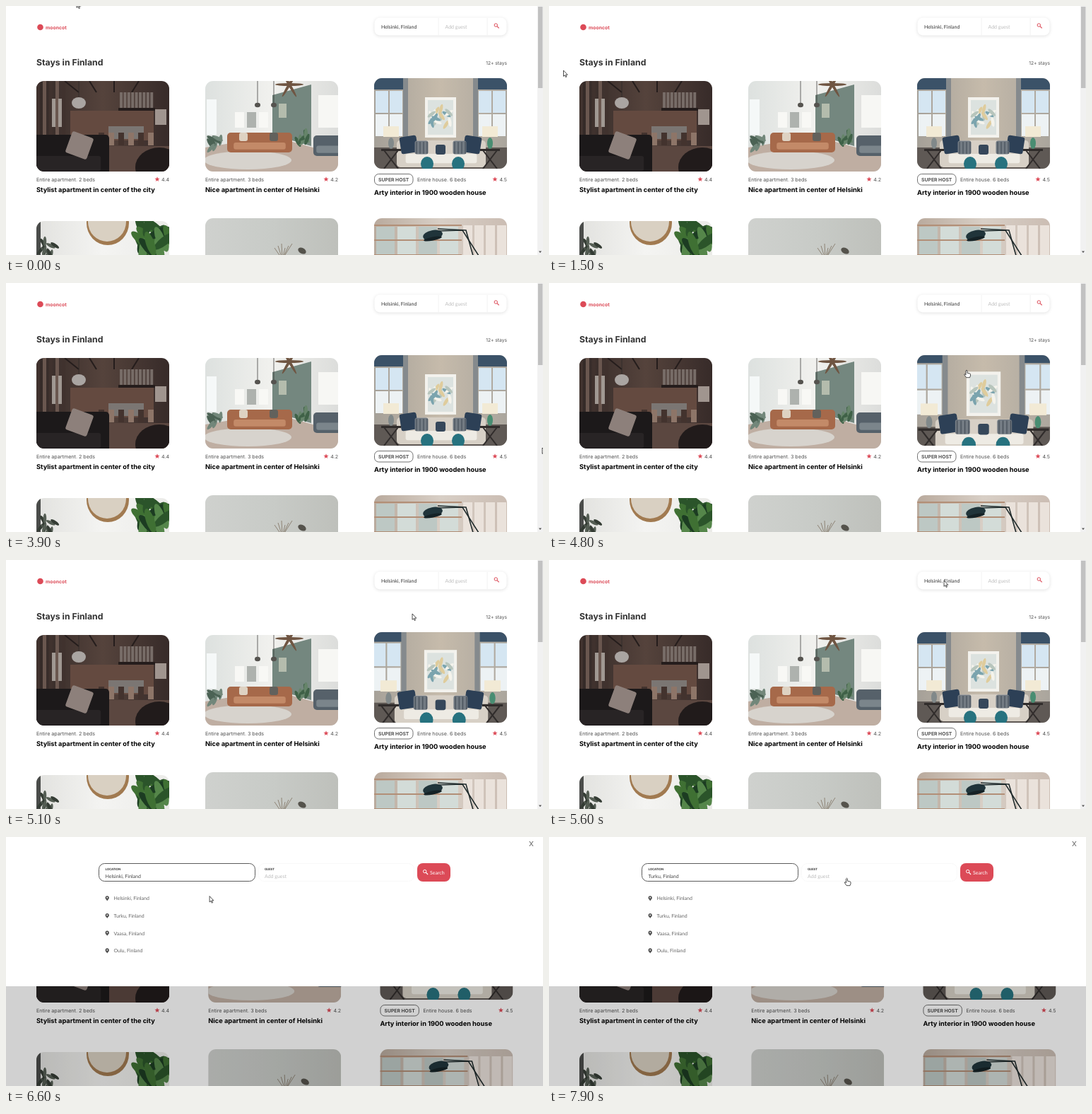
These frames come from a looping animation (760x352 px, 8 s). An HTML page with a canvas:

```html
<!DOCTYPE html>
<html lang="en">
<head>
<meta charset="utf-8">
<title>Stays in Finland</title>
<style>
html, body { margin: 0; width: 100%; height: 100%; overflow: hidden; background: #fff; }
canvas { display: block; width: 760px; height: 352px; }
</style>
</head>
<body>
<canvas id="stage"></canvas>
<script>
const W = 760, H = 352, LOOP = 8000, STEP = 100;
const OPEN = 5700, PICK = 7200, FADE = 400;
const CARD_W = 188, CARD_H = 128, LEFT = 43;
const RED = '#dc4a57', INK = '#4f4f4f', PALE = '#bdbdbd';
const HEAD = 'Inter, sans-serif', BODY = 'Lato, sans-serif';
const canvas = document.getElementById('stage');
const ctx = canvas.getContext('2d');
const dpr = window.devicePixelRatio || 1;
canvas.width = W * dpr;
canvas.height = H * dpr;
ctx.textRendering = 'geometricPrecision';

const clamp = v => Math.max(0, Math.min(1, v));
const smooth = v => { v = clamp(v); return v * v * (3 - 2 * v); };
const repeat = (n, fn) => { for (let i = 0; i < n; i++) fn(i); };

function random(seed) {
  return () => (seed = seed * 16807 % 2147483647) / 2147483647;
}

function rect(x, y, w, h, color) {
  ctx.fillStyle = color;
  ctx.fillRect(x, y, w, h);
}

function box(x, y, w, h, r, fill, stroke) {
  ctx.beginPath();
  ctx.roundRect(x, y, w, h, r);
  if (fill) { ctx.fillStyle = fill; ctx.fill(); }
  if (stroke) { ctx.strokeStyle = stroke; ctx.lineWidth = 0.8; ctx.stroke(); }
}

function oval(x, y, rx, ry, color, turn = 0) {
  ctx.beginPath();
  ctx.ellipse(x, y, rx, ry, turn, 0, Math.PI * 2);
  ctx.fillStyle = color;
  ctx.fill();
}

function trace(p) {
  ctx.beginPath();
  for (let i = 0; i < p.length; i += 2) ctx.lineTo(p[i], p[i + 1]);
}

function poly(color, ...p) {
  trace(p);
  ctx.fillStyle = color;
  ctx.fill();
}

function line(color, width, ...p) {
  trace(p);
  ctx.strokeStyle = color;
  ctx.lineWidth = width;
  ctx.stroke();
}

function text(str, x, y, size, weight, color, family = HEAD, align = 'left') {
  ctx.font = `${weight} ${size}px ${family}`;
  ctx.textAlign = align;
  ctx.fillStyle = color;
  ctx.fillText(str, x, y);
}

// Furniture shared by the rooms, which are CARD_W x CARD_H.
function wall(...colors) {
  const g = ctx.createLinearGradient(0, 0, CARD_W, 0);
  colors.forEach((c, i) => g.addColorStop(i / (colors.length - 1), c));
  rect(0, 0, CARD_W, CARD_H, g);
}

function sofa(x, y, w, h, back, seat) {
  box(x, y, w, h, 5, back);
  box(x + w * 0.1, y + h / 2, w * 0.8, h * 0.35, 3, seat);
}

function cushion(x, y, size, color, turn = 0) {
  ctx.save();
  ctx.translate(x, y);
  ctx.rotate(turn);
  box(-size / 2, -size / 2, size, size, 3, color);
  ctx.restore();
}

function lamp(x, y, r, color) {
  line('#2b2a29', 0.7, x, 0, x, y);
  oval(x, y, r, r * 0.8, color);
}

function leaves(x, y, n, spread, length, seed, colors) {
  const next = random(seed);
  repeat(n, i => oval(x + (next() - 0.5) * spread, y + (next() - 0.5) * spread,
    length / 3, length, colors[i % colors.length], (next() - 0.5) * 2.4));
}

function loft() {
  wall('#332927', '#55433c', '#372b29');
  repeat(5, i => rect(i * 9, 0, 5, 80, i % 2 ? '#6a574f' : '#40322e'));
  repeat(2, i => rect(22 + i * 9, 25, 5, 40, '#a09892'));
  repeat(4, i => line('#251d1c', 2, 40 + i * 35, 0, 60 + i * 25, 16));
  rect(48, 42, 118, 42, '#644a40');
  repeat(9, i => rect(118 + i * 5.4, 16, 4, 22, '#776c67'));
  rect(116, 38, 52, 4, '#251d1c');
  rect(168, 40, 16, 22, '#a0958f');
  rect(60, 92, 128, 36, '#5b4740');
  rect(102, 64, 50, 18, '#7b7673');
  repeat(6, i => rect(88 + i * 14, 73, 8, 18, i % 2 ? '#8d7568' : '#43332e'));
  lamp(60, 31, 10, '#aaa5a2');
  sofa(-15, 76, 118, 60, '#1c191a', '#282425');
  cushion(61, 91, 32, '#8d807b', 0.35);
  oval(174, 122, 34, 28, '#211b1b');
}

function lounge() {
  wall('#dde1df', '#f1f1ee', '#dcdddb');
  rect(2, 26, 14, 50, '#f5f8f8');
  repeat(3, i => rect(42 + i * 17, 44, 13, 22, i % 2 ? '#aeb2ae' : '#f8f8f5'));
  poly('#74877f', 95, 20, 150, 5, 150, 92, 95, 76);
  rect(104, 32, 11, 20, '#b4bcad');
  rect(160, 20, 28, 46, '#f7f7f4');
  poly('#bfaea2', 0, 94, 95, 78, 188, 104, 188, 128, 0, 128);
  oval(60, 112, 62, 13, '#d7d3cd');
  repeat(2, i => lamp(74 + i * 23, 34, 4, '#55534f'));
  repeat(3, i => oval(119, 5, 20, 2, '#6f5542', i * 1.05));
  sofa(31, 73, 92, 28, '#a6694a', '#c38a68');
  repeat(2, i => cushion(54 + i * 43, 79, 12, i ? '#62615c' : '#ded2c2'));
  leaves(138, 80, 9, 14, 8, 7, ['#3f6147', '#66846a']);
  sofa(153, 77, 42, 29, '#56616a', '#7b858b');
  leaves(16, 90, 8, 18, 8, 3, ['#4b6254', '#72877a']);
}

function salon() {
  wall('#a5a098', '#c6bbab', '#aaa59d');
  repeat(2, i => {
    const x = i * 146 + 2;
    repeat(4, p => rect(x + p % 2 * 20, 18 + (p >> 1) * 33, 18, 31, p < 2 ? '#d5e6f2' : '#edf2f4'));
    rect(x - 3, 0, 44, 16, '#3b5268');
    rect(i ? 140 : 41, 0, 7, 94, '#858a8d');
  });
  rect(72, 27, 44, 57, '#f3f2ed');
  rect(76, 31, 36, 49, '#dce2df');
  leaves(94, 54, 18, 26, 7, 11, ['#f4f3ec', '#7ba4ae', '#b7c5bc', '#dfcc9c']);
  rect(0, 98, CARD_W, 30, '#5f5955');
  sofa(32, 88, 126, 38, '#d7d0c6', '#eeebe4');
  repeat(2, i => {
    const side = i * 2 - 1, x = 94 + side * 70;
    cushion(94 + side * 45, 94, 24, '#2d4056', side * 0.15);
    cushion(94 + side * 27, 98, 19, '#737b83');
    repeat(4, k => line('#3f4852', 1, 87 + side * 27 + k * 5, 90, 87 + side * 27 + k * 5, 107));
    rect(x - 11, 68, 22, 15, '#f2ead5');
    oval(x, 92, 4, 8, i ? '#498d72' : '#81898a');
    rect(x - 14, 100, 28, 3, '#302c2b');
    repeat(2, k => line('#302c2b', 2, x - 10 + k * 20, 102, x + 10 - k * 20, 128));
    oval(97 + side * 22, 121, 9, 10, '#27727f');
  });
  cushion(94, 101, 14, '#36475a');
}

function mirrorRoom() {
  wall('#e2e2df', '#f4f4f2', '#ebebe8');
  rect(0, 0, 6, CARD_H, '#4a4c4a');
  oval(101, 3, 30, 31, '#a17a50');
  oval(100, 1, 27, 28, '#d9d0c2');
  leaves(17, 38, 12, 22, 7, 5, ['#343c34', '#555e54']);
  leaves(168, 24, 22, 42, 18, 23, ['#2b542a', '#3f7033', '#1c3c22', '#55864a']);
}

function paleRoom() {
  wall('#cfd1ce', '#c8cbc7', '#bec0bb');
  repeat(6, i => line('#8d8375', 1, 109, 58, 98 + i * 5, 42 - i % 3 * 3));
  oval(137, 46, 6, 4, '#55534c', 0.5);
}

function studio() {
  wall('#b9aa9d', '#d8cfc6', '#cbbdb3');
  repeat(4, i => rect(3 + i * 30, 12, 26, 40, i % 2 ? '#d3dcd8' : '#bdc8c4'));
  repeat(3, i => line('#b28f77', 2, 0, 10 + i * 21, 124, 10 + i * 21));
  repeat(4, i => rect(126 + i * 16, 10, 13, 42, '#eae2db'));
  repeat(2, i => line('#202b2c', 1.6, 90, 18 - i * 3, 125 + i * 5, 17, 148 - i * 8, 53));
  oval(83, 24, 14, 7, '#20343a', -0.2);
  oval(83, 29, 13, 2.5, '#152226', -0.2);
}

const stays = [
  { y: 106, draw: loft, kind: 'Entire apartment. 2 beds', rate: '4.4', title: 'Stylist apartment in center of the city' },
  { y: 106, draw: lounge, kind: 'Entire apartment. 3 beds', rate: '4.2', title: 'Nice apartment in center of Helsinki' },
  { y: 102, draw: salon, host: true, kind: 'Entire house. 6 beds', rate: '4.5', title: 'Arty interior in 1900 wooden house' },
  { y: 304, draw: mirrorRoom },
  { y: 300, draw: paleRoom },
  { y: 300, draw: studio }
];

function star(x, y) {
  const p = [];
  repeat(10, i => {
    const a = i * Math.PI / 5 - Math.PI / 2, r = i % 2 ? 1.6 : 3.7;
    p.push(x + r * Math.cos(a), y + r * Math.sin(a));
  });
  poly(RED, ...p);
}

function lens(x, y, color) {
  ctx.beginPath();
  ctx.arc(x, y, 2.2, 0, Math.PI * 2);
  ctx.strokeStyle = color;
  ctx.lineWidth = 1;
  ctx.stroke();
  line(color, 1.2, x + 1.6, y + 1.6, x + 4.4, y + 4.4);
}

function stay(s, x, zoom) {
  ctx.save();
  ctx.beginPath();
  ctx.roundRect(x, s.y, CARD_W, CARD_H, 11);
  ctx.clip();
  ctx.translate(x + CARD_W / 2, s.y + CARD_H / 2);
  ctx.scale(zoom, zoom);
  ctx.translate(-CARD_W / 2, -CARD_H / 2);
  s.draw();
  ctx.restore();
  if (!s.title) return;
  if (s.host) {
    box(x + 0.5, 237.5, 54.5, 15.5, 6, null, INK);
    text('SUPER HOST', x + 27.7, 247.6, 6.8, 700, INK, HEAD, 'center');
  }
  text(s.kind, x + (s.host ? 61 : 0), 247.6, 7.15, 400, INK);
  star(x + 171, 245);
  text(s.rate, x + CARD_W, 247.6, 7.1, 400, INK, HEAD, 'right');
  text(s.title, x, s.host ? 267.2 : 263.2, 9.25, 700, '#000');
}

function header() {
  oval(48.5, 30, 4.3, 4.3, RED);
  text('mooncot', 56, 33, 6.9, 700, RED);
  ctx.save();
  ctx.shadowColor = 'rgba(0,0,0,.12)';
  ctx.shadowBlur = 5 * dpr;
  ctx.shadowOffsetY = dpr;
  box(521.5, 16.5, 187, 25, 8, '#fff');
  ctx.restore();
  for (const x of [612, 681]) line('#f2f2f2', 1, x, 17, x, 41);
  text('Helsinki, Finland', 531, 32, 7, 400, '#333', BODY);
  text('Add guest', 621.5, 32, 7, 400, PALE, BODY);
  lens(693.3, 27, RED);
  text('Stays in Finland', LEFT, 84.2, 12.25, 700, '#333');
  text('12+ stays', 709, 82.6, 6.7, 400, INK, HEAD, 'right');
}

function scrollbar() {
  rect(752, 0, 8, H, '#f1f1f1');
  rect(753, 1, 6.4, 115, '#c1c1c1');
  poly('#505050', 754, 346.6, 758, 346.6, 756, 349);
}

function pin(x, y) {
  oval(x, y - 0.8, 2.6, 2.6, INK);
  poly(INK, x - 2.4, y, x + 2.4, y, x, y + 3.8);
  oval(x, y - 0.9, 0.9, 0.9, '#fff');
}

function field(x, label, value, color) {
  text(label, x, 47.3, 4.3, 800, '#333', BODY);
  text(value, x, 58, 7, 400, color, BODY);
}

function panel(t) {
  const fade = clamp((t - OPEN) / FADE);
  rect(0, 0, W, H, 'rgba(0,0,0,.18)');
  rect(0, 0, W, 211, '#fff');
  line('#444', 0.9, 740.8, 6, 746, 13);
  line('#444', 0.9, 746, 6, 740.8, 13);
  box(357.5, 37.5, 220, 25, 8, '#fff', '#f7f7f7');
  box(131.5, 37.5, 221, 25, 8, '#fff', `rgba(51,51,51,${0.5 + fade / 2})`);
  field(140.5, 'LOCATION', (t < PICK ? 'Helsinki' : 'Turku') + ', Finland', '#444');
  field(366, 'GUEST', 'Add guest', PALE);
  ctx.globalAlpha = 0.12 + 0.88 * fade;
  box(582, 37, 47, 26, 8, RED);
  ctx.globalAlpha = fade;
  lens(592.7, 48.6, '#fff');
  text('Search', 600, 52.5, 7, 400, '#fff', BODY);
  ctx.globalAlpha = 1;
  ['Helsinki', 'Turku', 'Vaasa', 'Oulu'].forEach((city, i) => {
    const y = 86.6 + i * 24.7;
    pin(143.2, y);
    text(city + ', Finland', 152.5, y + 2.6, 7, 400, '#666', BODY);
  });
}

// Pointer tip: time, x, y.
const trip = [
  [0, 100, -6], [900, 50, 14], [1500, 20.5, 91], [2300, 20.5, 91],
  [3900, 759, 233], [4800, 591, 123], [5400, 559, 29], [5900, 559, 29],
  [6900, 172, 107], [7400, 172, 107], [7900, 421.5, 58], [LOOP, 421.5, 58]
];

function tip(t) {
  const i = trip.findIndex(k => k[0] > t);
  const [t0, x0, y0] = trip[i - 1], [t1, x1, y1] = trip[i];
  const u = (t - t0) / (t1 - t0);
  return [x0 + (x1 - x0) * u, y0 + (y1 - y0) * u];
}

const inside = (x, y, l, t, w, h) => x > l && x < l + w && y > t && y < t + h;

function overLink(x, y, open) {
  if (!open) return inside(x, y, 521, 102, CARD_W, CARD_H);
  return inside(x, y, 131, 37, 449, 27) || inside(x, y, 136, 100, 74, 22);
}

const arrow = new Path2D('M0 0V8.4L1.9 6.7L3.2 9.6L4.5 9L3.2 6.2H5.8Z');
const hand = new Path2D('M-1 1Q0 -.7 1 1V4.2L4.3 5Q5.5 5 5.5 6.2V8L4.5 10.7H-.4L-2.8 7.2Q-3.8 5.6-2.3 5.6L-1 6.8Z');

function pointer(t, open) {
  if (t >= 2300 && t < 3900) return;
  const [x, y] = tip(t);
  const shape = overLink(x, y, open) ? hand : arrow;
  ctx.save();
  ctx.translate(x, y);
  ctx.fillStyle = '#fff';
  ctx.strokeStyle = '#222';
  ctx.lineWidth = 0.8;
  ctx.lineJoin = 'round';
  ctx.fill(shape);
  ctx.stroke(shape);
  ctx.restore();
}

function draw(t) {
  const open = t >= OPEN;
  const gap = open ? 243.2 : 239;
  const hover = smooth((t - 4200) / 300) - smooth((t - 4950) / 300);
  ctx.setTransform(dpr, 0, 0, dpr, 0, 0);
  rect(0, 0, W, H, '#fff');
  if (!open) header();
  stays.forEach((s, i) => stay(s, LEFT + i % 3 * gap, s.host ? 1 + 0.1 * hover : 1));
  if (open) panel(t);
  else scrollbar();
  pointer(t, open);
}

const start = performance.now();
function tick() {
  const t = (performance.now() - start) % LOOP;
  draw(Math.floor(t / STEP) * STEP);
  requestAnimationFrame(tick);
}
tick();
</script>
</body>
</html>
```
